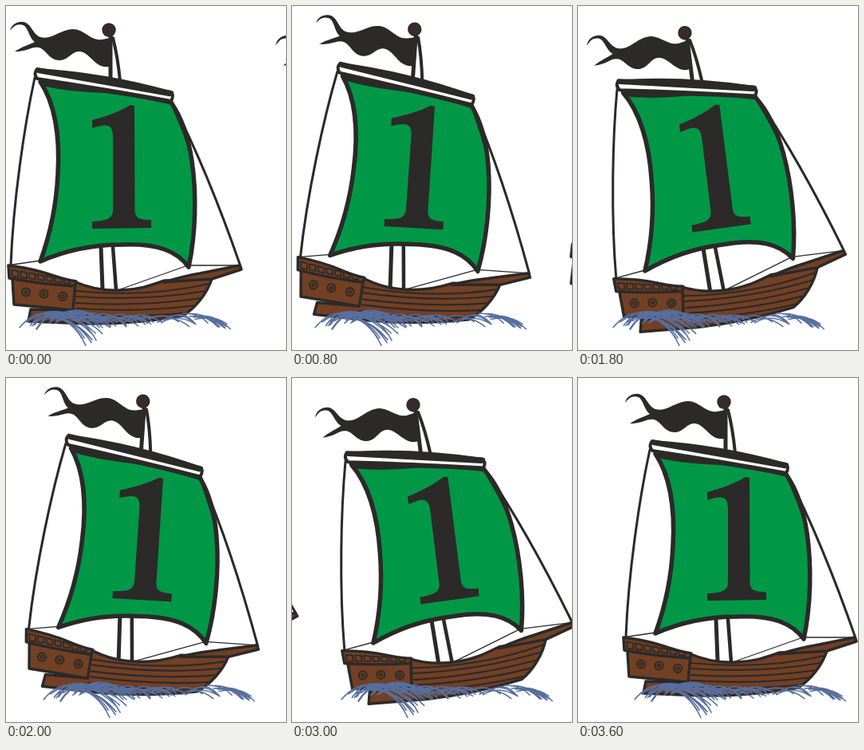
An HTML page with a canvas for the animation above (3800 ms loop, 351 by 431 pixels).

```html
<!DOCTYPE html>
<html lang="en">
<head>
<meta charset="utf-8">
<title>Rocking ship</title>
<style>
  html, body { margin: 0; width: 100%; height: 100%; overflow: hidden; background: #fff; }
  canvas { display: block; }
</style>
</head>
<body>
<canvas id="stage" width="351" height="431" role="img" aria-label="Sailing ship with the number 1 on its sail"></canvas>
<script>
const ctx = document.getElementById('stage').getContext('2d');
const INK = '#2b2a29', GREEN = '#009846', BROWN = '#734024', BLUE = '#566f9f', KNOB = '#3a2b29';
const STEP = 200, STEPS = 19, DRIFT = 3, WIDTH = 351;
const TILT = [0, -7, -11.5, -7, 4, 10];   // degrees, one rocking cycle
const PIVOT = { x: 148, y: 212 };

const path = d => new Path2D(d);
const shapes = {
  flag: path(`M5 31 C7 23 14 19 22 20 C32 22 33 35 43 39 C58 43 68 29 84 29
    C98 29 106 44 120 42 Q128 41 133 39 L133 75 C113 82 107 59 93 57
    C82 56 79 68 67 68 C54 68 50 54 41 52 C33 50 27 57 11 57
    C20 51 28 49 36 45 C28 39 28 25 20 23.5 C13 22 9 26 5 31 Z`),
  upperMast: path('M131 38 L131 93'),
  upperStay: path('M134 40 Q140 63 143 94'),
  lowerMast: path('M119 302 L121 354'),
  lowerMastRight: path('M134 302 L138 356'),
  leftRope: path('M36 90 C23 150 9 245 6 325'),
  rightRope: path('M208 120 Q252 205 294 326'),
  thinRopes: path('M2 325 L43 319 M140 356 L228 325 L294 325'),
  sail: path(`M43 95 C60 120 68 160 65 210 C63 255 54 290 43 320
    C75 306 110 299 145 299 C190 297 214 307 229 327
    C238 285 239 235 233 194 C228 160 219 138 207 121 C160 109 95 103 43 95 Z`),
  sailShade: path('M206 120 C219 137 230 165 235 205 C229 172 220 152 206 120 Z M42 93 L140 108 Q85 108 46 99 Z'),
  yard: path('M39 79 Q124 92 207 108 Q211 112 207 119 Q125 104 39 91 Q34 85 39 79 Z'),
  yardTop: path('M38 79 Q124 84 209 108 Q208 113 204 112 Q124 98 40 83 Z'),
  numeral: path(`M108 143 C127 138 142 132 156 124 L161 125 L161.5 254
    C161.5 265 165 268 182 268 L182 278 L108 279 L108 270
    C128 269 134 266 134 255 L134 165 C134 149 129 146 108 153 Z`),
  hull: path(`M85 345 C105 354 125 357 145 356 C170 355 184 349 199 344
    L258 342 C252 360 238 378 222 388 Q160 399 100 398 L28 395 L31 380 L84 381 Z`),
  planks: path(`M88 357 Q175 366 255 348 M88 364 Q175 370 250 357
    M88 372 Q170 377 245 366 M88 379 Q170 384 238 375 M85 387 Q165 391 228 384`),
  castle: path('M8 342 L10 374 L84 381 L87 348 Z'),
  rail: path('M3 325 Q35 329 60 338 Q75 343 88 345 L86 351 Q40 348 4 341 Z'),
  bowsprit: path('M198 346 Q225 338 243 335 L293 325 L295 330 L258 342 Q225 344 198 346 Z')
};

let seed = 7;
const random = () => (seed = seed * 16807 % 2147483647) / 2147483647;
const jitter = amount => (random() * 2 - 1) * amount;

const waves = new Path2D();
function spray(count, x, y, bendX, bendY, endX, endY, spreadX, spreadY) {
  for (let i = 0; i < count; i++) {
    const shift = jitter(spreadX);
    waves.moveTo(x + shift, y + jitter(4));
    waves.quadraticCurveTo(x + bendX + shift, y + bendY + jitter(4),
      x + endX + shift + jitter(5), y + endY + jitter(spreadY));
  }
}
spray(8, 80, 389, -28, -14, -50, 11, 10, 6);    // crest at the stern
spray(10, 62, 388, 28, 4, 46, 30, 16, 9);       // long drops
spray(10, 50, 394, 30, -20, 65, 4, 14, 6);      // humps
spray(22, 150, 393, 18, -12, 38, 5, 62, 4);     // bow wave along the hull
spray(10, 232, 389, 20, -3, 35, 11, 10, 5);

function fill(shape, color) {
  ctx.fillStyle = color;
  ctx.fill(shape);
}
function line(shape, width, color = INK) {
  ctx.strokeStyle = color;
  ctx.lineWidth = width;
  ctx.stroke(shape);
}
function disc(x, y, radius, color) {
  ctx.beginPath();
  ctx.arc(x, y, radius, 0, Math.PI * 2);
  ctx.fillStyle = color;
  ctx.fill();
}

function drawRigging() {
  line(shapes.upperMast, 5);
  line(shapes.upperStay, 4);
  line(shapes.lowerMast, 5);
  line(shapes.lowerMastRight, 4.5);
  fill(shapes.flag, INK);
  disc(129, 30, 8.7, INK);
  disc(129, 30, 7, KNOB);
  line(shapes.leftRope, 3);
  line(shapes.rightRope, 3);
  fill(shapes.sail, GREEN);
  line(shapes.sail, 5.5);
  fill(shapes.sailShade, INK);
  line(shapes.sailShade, 2);
  fill(shapes.yard, '#fff');
  line(shapes.yard, 4);
  fill(shapes.yardTop, INK);
  line(shapes.yardTop, 2);
  fill(shapes.numeral, INK);
  line(shapes.thinRopes, 1.3);
}

function drawHull() {
  for (const part of ['hull', 'castle', 'rail', 'bowsprit']) {
    fill(shapes[part], BROWN);
    line(shapes[part], 3.5);
    if (part === 'hull') line(shapes.planks, 2.2);
  }
  for (let i = 0; i < 7; i++) {
    const x = 7 + i * 10.8, y = 330.5 + i * 1.9;
    line(path(`M${x} ${y} l8 1.6 l0.5 ${7.5 - i * 0.5} l-7.5 -1 Z`), 1.8);
  }
  for (const [x, y] of [[25, 358.5], [47.5, 360.5], [71, 364]]) {
    disc(x, y, 6, INK);
    disc(x, y, 4, BROWN);
    disc(x, y, 2.7, INK);
    disc(x, y, 1, BROWN);
  }
}

function drawShip(step, offset) {
  ctx.save();
  ctx.translate(offset + step * DRIFT, 0);
  ctx.save();
  ctx.translate(PIVOT.x, PIVOT.y);
  ctx.rotate(TILT[(step + 6) % 6] * Math.PI / 180);
  ctx.translate(-PIVOT.x, -PIVOT.y);
  drawRigging();
  drawHull();
  ctx.restore();
  line(waves, 1.5, BLUE);
  ctx.restore();
}

function render(now) {
  const step = Math.floor(now / STEP) % STEPS;
  ctx.fillStyle = '#fff';
  ctx.fillRect(0, 0, WIDTH, 431);
  // The poses before and after sit one stage away and peek in at the edges.
  for (const side of [-1, 1, 0]) drawShip(step + side, side * WIDTH);
  requestAnimationFrame(() => render(performance.now() - start));
}

ctx.lineJoin = ctx.lineCap = 'round';
const start = performance.now();
render(0);
</script>
</body>
</html>
```
